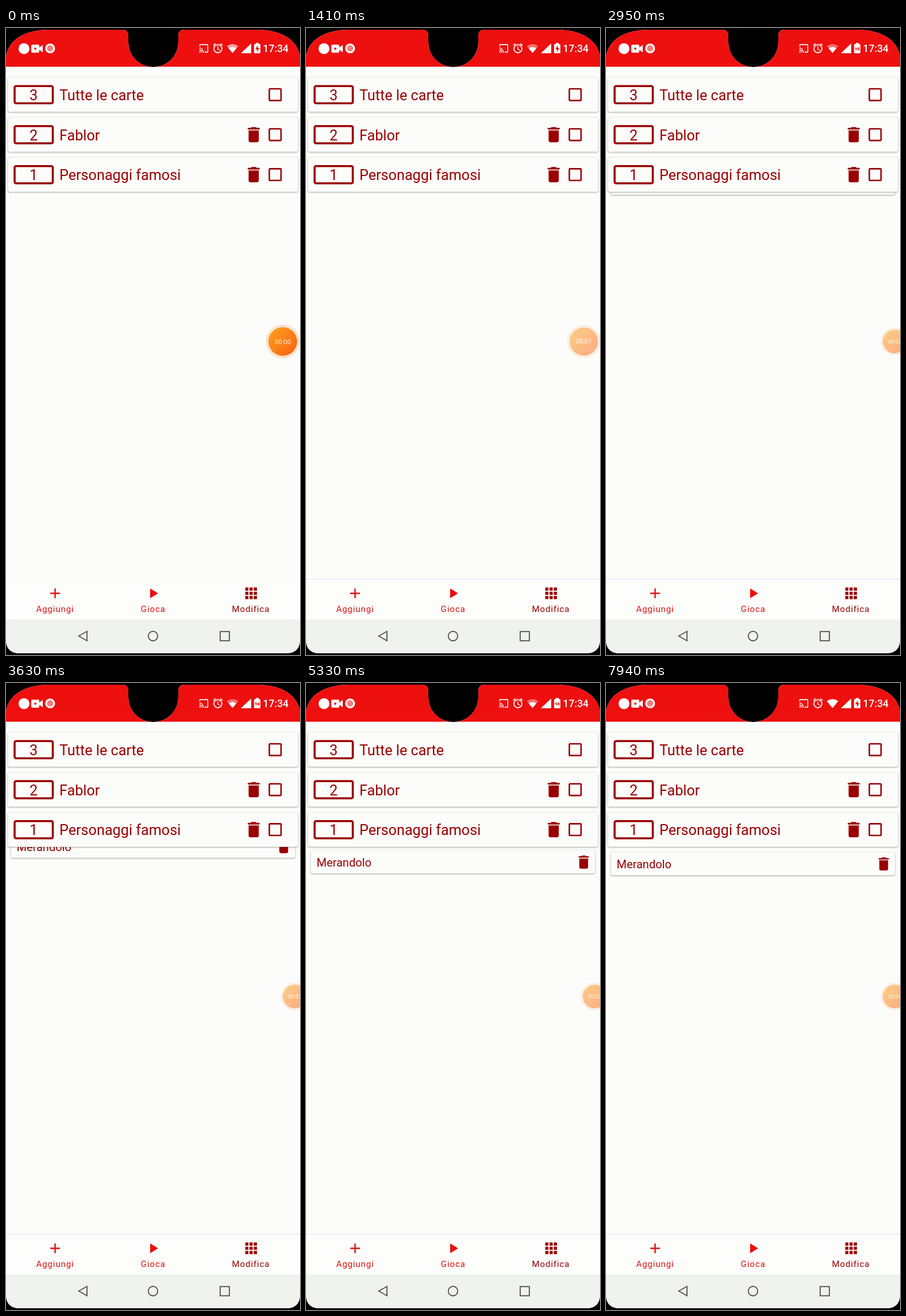
An HTML page that plays this animation: 512x1093 px, repeating every 7.99 s.

```html
<!DOCTYPE html>
<html lang="it">
<head>
<meta charset="utf-8">
<title>Carte</title>
<style>
  html, body { margin: 0; width: 100%; height: 100%; overflow: hidden; background: #000; }
  svg { display: block; width: 100vw; height: 100vh; }
  text { font-family: Roboto, sans-serif; }
  .card { fill: #fcfdfb; stroke: #e6e9e3; stroke-width: .6; filter: drop-shadow(0 1px 1px rgba(0, 0, 0, .34)); }
  .dark { fill: #990000; }
  .box { fill: none; stroke: #990000; }
  .title { font-size: 25.2px; }
  .label { font-size: 15px; letter-spacing: .9px; }
  .mid { text-anchor: middle; }
  .keys { fill: none; stroke: #555753; stroke-width: 1.9; }
</style>
</head>
<body>
<svg viewBox="0 0 512 1093" preserveAspectRatio="none">
  <defs>
    <linearGradient id="orange" x1="0" y1="0" x2="1" y2="1">
      <stop offset="0" stop-color="#ffa41c"/>
      <stop offset="1" stop-color="#f95f14"/>
    </linearGradient>
    <clipPath id="screen">
      <path d="M0 50C4 22 30 3 76 3H202Q213 3 213 14V25A43.5 43 0 0 0 300 25V14Q300 3 311 3H436C482 3 508 22 512 50V1066Q512 1090 488 1090H24Q0 1090 0 1066Z"/>
    </clipPath>
    <path id="trash" d="M6 19c0 1.1.9 2 2 2h8c1.1 0 2-.9 2-2V7H6v12zM19 4h-3.5l-1-1h-5l-1 1H5v2h14V4z"/>
  </defs>
  <rect width="512" height="1093"/>
  <g clip-path="url(#screen)">
    <rect width="512" height="1093" fill="#fcfdfb"/>
    <!-- the notch shows through to black below the bar's cut-out -->
    <rect width="512" height="67.5" fill="#ee0f0f"/>

    <g id="sub">
      <rect class="card" x="8.5" y="295" width="495" height="40" rx="3"/>
      <text class="dark" x="18.5" y="323" font-size="20">Merandolo</text>
      <use class="dark" href="#trash" transform="translate(468.4 300.2) scale(1.27)"/>
    </g>
    <g id="rows"></g>

    <rect y="960" width="512" height="71" fill="#fdfefc"/>
    <rect id="edge" y="960" width="512" height="1.6" fill="#e9e8f2"/>
    <path d="M77 985.5H94M85.5 977V994" stroke="#e01010" stroke-width="2.4"/>
    <path d="M251 977L264.8 985.5L251 994Z" fill="#f00c0c"/>
    <g id="grid" class="dark"></g>
    <g class="label mid">
      <text x="85.6" y="1018" fill="#dd1111">Aggiungi</text>
      <text x="256.3" y="1018" fill="#e01010">Gioca</text>
      <text x="426.5" y="1018" fill="#990000">Modifica</text>
    </g>
    <rect y="1031" width="512" height="62" fill="#f0f2ee"/>
    <g class="keys">
      <path d="M126.8 1060L141 1051.8V1068.2Z"/>
      <circle cx="256" cy="1060" r="8.2"/>
      <rect x="373" y="1052.2" width="16" height="16"/>
    </g>

    <g fill="#fff">
      <circle cx="31.3" cy="36" r="9.5"/>
      <path d="M46 29H56Q58 29 58 31V34L64 29.5V42.5L58 38V41Q58 43 56 43H46Q44 43 44 41V31Q44 29 46 29Z"/>
      <circle cx="51" cy="36" r="2" fill="#ee0f0f"/>
      <circle cx="76.8" cy="35.5" r="8.6"/>
      <circle cx="76.8" cy="35.5" r="5.4" fill="#f37f78"/>
      <path transform="translate(336 25.6) scale(.7 .83)" d="M21 3H3c-1.1 0-2 .9-2 2v3h2V5h18v14h-7v2h7c1.1 0 2-.9 2-2V5c0-1.1-.9-2-2-2zM1 18v3h3c0-1.66-1.34-3-3-3zm0-4v2c2.76 0 5 2.24 5 5h2c0-3.87-3.13-7-7-7zm0-4v2c4.97 0 9 4.03 9 9h2c0-6.08-4.93-11-11-11z"/>
      <path transform="translate(358.6 24.8) scale(.87)" d="M22 5.72l-4.6-3.86-1.29 1.53 4.6 3.86L22 5.72zM7.88 3.39L6.6 1.86 2 5.71l1.29 1.53 4.59-3.85zM12.5 8H11v6l4.75 2.85.75-1.23-4-2.37V8zM12 4c-4.97 0-9 4.03-9 9s4.02 9 9 9c4.97 0 9-4.03 9-9s-4.03-9-9-9zm0 16c-3.87 0-7-3.13-7-7s3.13-7 7-7 7 3.13 7 7-3.13 7-7 7z"/>
      <path id="wifi" d="M384.5 31.5Q394.5 24.5 404.5 31.5L394.5 43.5Z"/>
      <path d="M387.8 35.5Q394.5 30.5 401.2 35.5L394.5 43.5Z"/>
      <path d="M409 44H427V27Z"/>
      <path d="M432 29.5Q432 28 433.5 28H435V26H440V28H441.5Q443 28 443 29.5V42.5Q443 44 441.5 44H433.5Q432 44 432 42.5Z"/>
      <path id="bolt" d="M438.6 30L434 37H437V42L441.2 35H438.4Z" fill="#ee0f0f"/>
      <text id="charge" class="mid" x="437.5" y="39" font-size="8" font-weight="700" fill="#ee0f0f">98</text>
      <text x="447.6" y="42" font-size="17.5" font-weight="500">17:34</text>
    </g>

    <g id="bubble">
      <circle r="29.7" fill="#fbe3d0"/>
      <circle r="25" fill="url(#orange)"/>
      <text id="timer" class="mid" y="4" font-size="11.3" fill="#fff3df"></text>
    </g>
  </g>
</svg>
<script>
  const LOOP = 7990;
  const $ = id => document.getElementById(id);
  const show = (el, on) => el.setAttribute("visibility", on ? "visible" : "hidden");

  const row = ([count, name], i) => {
    const trash = i ? '<use class="dark" href="#trash" transform="translate(413.6 98.5) scale(1.48)"/>' : "";
    return `<g transform="translate(0 ${i * 69.7})">
      <rect class="card" x="3.5" y="86" width="505" height="60" rx="3"/>
      <rect class="box" x="15" y="101.3" width="66.5" height="30" rx="2.5" stroke-width="3.6"/>
      <text class="title dark mid" x="48" y="126">${count}</text>
      <text class="title dark" x="93" y="126">${name}</text>${trash}
      <rect class="box" x="458.6" y="106" width="20.4" height="20.4" rx="1.5" stroke-width="2.6"/>
    </g>`;
  };
  $("rows").innerHTML = [[3, "Tutte le carte"], [2, "Fablor"], [1, "Personaggi famosi"]].map(row).join("");

  let cells = "";
  for (let i = 0; i < 9; i++) {
    cells += `<rect x="${416.7 + i % 3 * 7.4}" y="${975.3 + Math.floor(i / 3) * 7.4}" width="5.5" height="5.5"/>`;
  }
  $("grid").innerHTML = cells;

  // Accelerate, then decelerate, between two times.
  const ease = (t, start, end) => {
    const x = Math.min(1, Math.max(0, (t - start) / (end - start)));
    return (1 - Math.cos(Math.PI * x)) / 2;
  };
  const ticks = [20, 2910, 6300, 7390];

  function draw(t) {
    $("sub").setAttribute("transform", `translate(0 ${-71.5 * (1 - ease(t, 665, 6065))})`);
    show($("sub"), t >= 430);
    show($("edge"), t >= 20);

    const dock = ease(t, 1100, 2750);
    $("bubble").setAttribute("transform", `translate(${482 + 20.5 * dock} 546.5) scale(${1 - .18 * dock})`);
    $("bubble").setAttribute("opacity", t < 1100 ? 1 : .52);
    $("timer").textContent = "00:0" + ticks.filter(at => t >= at).length;

    const numeric = t >= 2910 && t < 6620;
    show($("bolt"), !numeric);
    show($("charge"), numeric);
    $("wifi").setAttribute("opacity", t < 20 ? .6 : t < 6620 ? .4 : 1);
  }

  const origin = performance.now();
  function tick() {
    draw((performance.now() - origin) % LOOP);
    requestAnimationFrame(tick);
  }
  tick();
</script>
</body>
</html>
```
